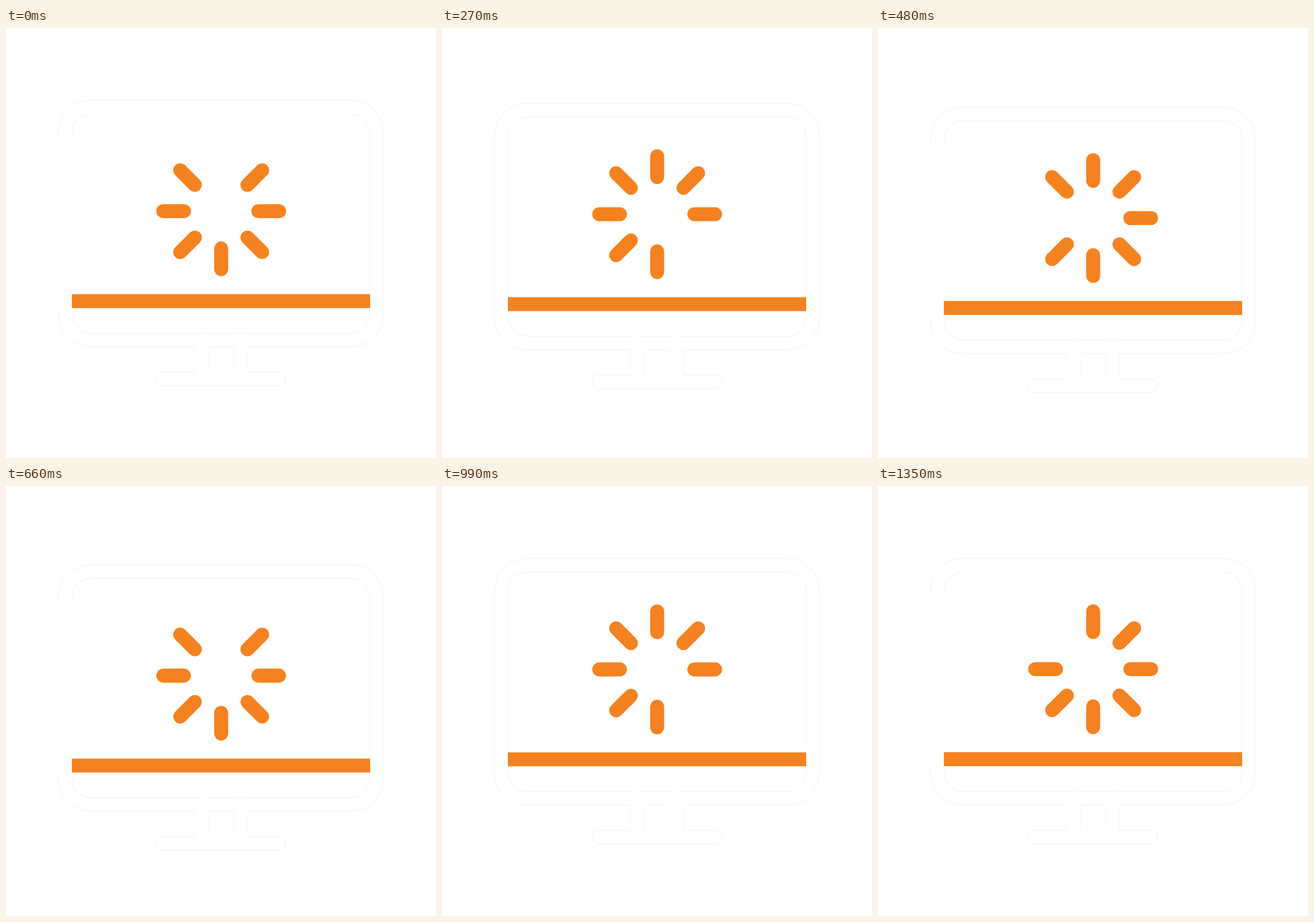
Recreate the animation shown at these times as an HTML page. Size 640x640 px, loop 1.38 s.

```html
<!DOCTYPE html>
<html lang="en">
<head>
<meta charset="utf-8">
<title>Loading monitor</title>
<style>
  html, body { margin: 0; width: 100%; height: 100%; overflow: hidden; background: #fff; }
  svg { display: block; width: 100vw; height: 100vh; }
  .edge { fill: none; stroke: #ededed; stroke-width: .7; }
  .side { stroke: #f5f5f5; }
  .petal { stroke: #f58220; stroke-width: 20.8; stroke-linecap: round; }
</style>
</head>
<body>
<svg viewBox="0 0 640 640">
  <g id="monitor">
    <g class="edge">
      <path d="M78 156A48.5 48.5 0 0 1 126.5 107.5H513.5A48.5 48.5 0 0 1 562 156"/>
      <path d="M78 426A48.5 48.5 0 0 0 126.5 474.5H281M301.5 474.5H338.5M359 474.5H513.5A48.5 48.5 0 0 0 562 426"/>
      <path d="M98.3 156A28 28 0 0 1 126.5 128M513.5 128A28 28 0 0 1 541.7 156"/>
      <path id="innerTop" d="M126.5 128H513.5"/>
      <path d="M98.3 426A28.3 28.3 0 0 0 126.5 454.5H288M294 454.5H346M352 454.5H513.5A28.3 28.3 0 0 0 541.7 426"/>
      <path class="side" d="M78 156V426M562 156V426M98.3 156V426M541.7 156V426"/>
      <path class="side" d="M281 474.5V512.3M301.5 474.5V512.3M338.5 474.5V512.3M359 474.5V512.3"/>
      <path d="M281 512.3H233.5A10.1 10.1 0 0 0 233.5 532.5H406.5A10.1 10.1 0 0 0 406.5 512.3H359"/>
    </g>
    <rect x="98" y="396.2" width="444" height="20.7" fill="#f58220"/>
    <g id="spinner" transform="translate(320.25 272.7)"></g>
  </g>
</svg>
<script>
  const LOOP = 1380, TICK = 30;
  const HALF = 540, DROP = 10.3;
  const STEP = 92, LEAD = 78;

  const monitor = document.getElementById('monitor');
  const innerTop = document.getElementById('innerTop');
  const spinner = document.getElementById('spinner');

  const petals = Array.from({ length: 8 }, (_, i) => {
    const line = document.createElementNS('http://www.w3.org/2000/svg', 'line');
    line.setAttribute('class', 'petal');
    line.setAttribute('y1', -55.3);
    line.setAttribute('y2', -86.3);
    line.setAttribute('transform', `rotate(${i * 45})`);
    return spinner.appendChild(line);
  });

  // Cubic bezier (x1, 0, x2, 1), solved by bisection
  function ease(x, x1 = 0.63, x2 = 0.45) {
    if (x <= 0 || x >= 1) return x <= 0 ? 0 : 1;
    let lo = 0, hi = 1, v = 0.5;
    for (let i = 0; i < 24; i++) {
      v = (lo + hi) / 2;
      const w = 1 - v;
      const at = 3 * w * w * v * x1 + 3 * w * v * v * x2 + v * v * v;
      if (at < x) lo = v; else hi = v;
    }
    return v * v * (3 - 2 * v);
  }

  function draw(ms) {
    const t = Math.floor((ms % LOOP) / TICK) * TICK;
    const y = DROP * ease(1 - Math.abs(t - HALF) / HALF);
    monitor.setAttribute('transform', `translate(0 ${y.toFixed(3)})`);
    innerTop.style.display = y === 0 ? 'none' : '';

    const hidden = Math.floor((t + LEAD) / STEP) % 8;
    petals.forEach((p, i) => { p.style.display = i === hidden ? 'none' : ''; });
  }

  const start = performance.now();
  function loop() {
    draw(performance.now() - start);
    requestAnimationFrame(loop);
  }
  loop();
</script>
</body>
</html>
```
